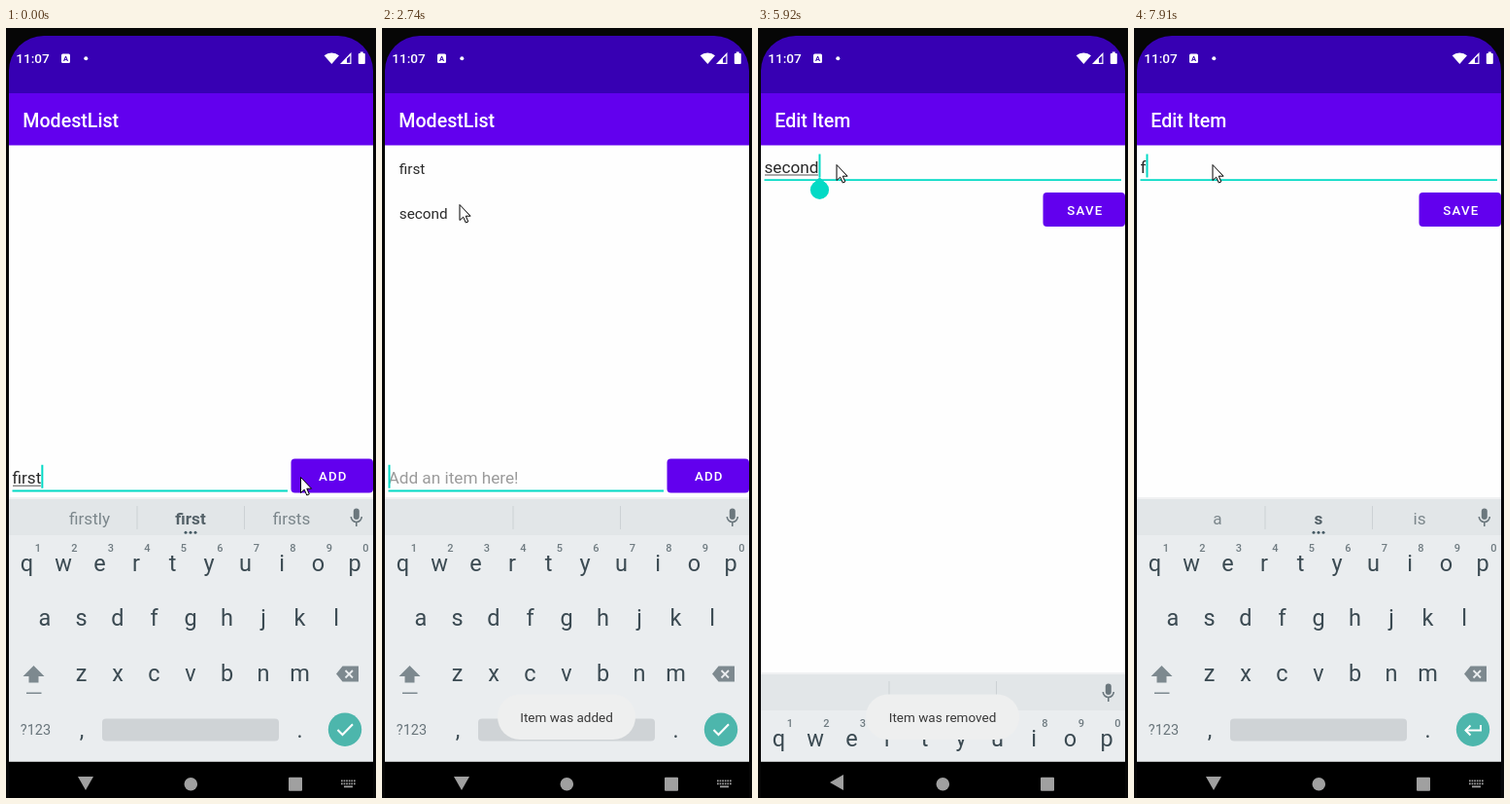
These frames come from a looping animation (381x791 px, 8 s). An HTML page with a canvas:

```html
<!DOCTYPE html>
<html lang="en">
<head>
<meta charset="utf-8">
<style>
  html, body { margin: 0; width: 100%; height: 100%; overflow: hidden; background: #060606; }
  canvas { display: block; }
</style>
</head>
<body>
<canvas id="stage" width="381" height="791"></canvas>
<script>
const LOOP = 8000, STEP = 120, W = 381, H = 791;
const PURPLE = '#6200ee', DARK_PURPLE = '#3700b3', TEAL = '#03dac5', INK = '#2a2a2a';
const KEY_INK = '#3b4a52', ICON_GRAY = '#6b777d', NAV_GRAY = '#a0a0a0', KEY_FILL = '#eaedef';
const APP_NAME = 'ModestList';
const PIVOT = [190.5, 399.5], KEYBOARD_HEIGHT = 270;

// Moments of the story, in ms.
const TAP_ADD = 150, FIRST_SHOWN = 410, TYPE = 650, TYPED = 1490;
const TAP_ADD_AGAIN = 2260, SECOND_SHOWN = 2380, REMOVE = 4040, REMOVED_NOTICE = 4280;
const OPEN_EDITOR = 5300, EDITOR_READY = 5540, FOCUS = 5800, KEYBOARD_RISE = 5920;
const KEYBOARD_UP = 6160, ERASE = 7190, RETYPE = 7910;

const pointerStart = [303, 461];
const pointerMoves = [ // start, steps, x, y
  [TAP_ADD, 2, 309.5, 460], [2500, 3, 79.5, 181], [2890, 3, 53, 131], [3280, 3, 38, 143],
  [4540, 4, 73, 141], [5050, 1, 68, 140], [5680, 2, 80.5, 140]];

const completions = {
  first: 'firstly first firsts',
  s: 'a s is',
  se: 'see se send',
  sec: 'second sec security',
  seco: 'seconds second secondary',
  secon: 'seconds second secondary',
  second: 'secondary second seconds'
};

const stage = document.getElementById('stage').getContext('2d');
const layerCanvas = Object.assign(document.createElement('canvas'), { width: W, height: H });
const layer = layerCanvas.getContext('2d');
let c = stage;

// Rises from 0 to 1 in equal steps; the first step is taken at the start itself.
const ramp = (t, start, steps) =>
  Math.min(1, Math.max(0, (Math.floor((t - start) / STEP) + 1) / steps));
const keysPressed = (t, start, interval) => Math.max(0, Math.floor((t - start) / interval) + 1);
const blink = elapsed => elapsed % 1000 < 500;

function newItemText(t) {
  if (t < 270) return 'first';
  return t < SECOND_SHOWN ? 'second'.slice(0, keysPressed(t, TYPE, (TYPED - TYPE) / 5)) : '';
}

function editText(t) {
  return t >= RETYPE ? 'f' : 'second'.slice(0, Math.max(0, 6 - keysPressed(t, ERASE, STEP)));
}

// Suggestions lag one step behind the typing and stay when the field is erased.
function suggestions(t) {
  if (t < OPEN_EDITOR) return newItemText(t) && completions[newItemText(t - STEP)];
  return t >= KEYBOARD_UP + STEP && completions[editText(t - STEP) || 's'];
}

function newItemCaret(t) {
  if (t < TYPED) return true;
  return blink(t - (t < TAP_ADD_AGAIN ? TYPED : TAP_ADD_AGAIN + 10));
}

const editCaret = t => t < KEYBOARD_UP || t >= ERASE || blink(t - KEYBOARD_UP);
const tapGlow = (t, start) => .25 * Math.sin(Math.PI * ramp(t, start, 4));
const keyboardDrop = t =>
  t < OPEN_EDITOR ? 0 : KEYBOARD_HEIGHT * (1 - ramp(t, KEYBOARD_RISE, 3));

function rect(x, y, w, h, color, radius = 0) {
  c.fillStyle = color;
  c.beginPath();
  c.roundRect(x, y, w, h, radius);
  c.fill();
}

function circle(x, y, r, color) {
  c.fillStyle = color;
  c.beginPath();
  c.arc(x, y, r, 0, 7);
  c.fill();
}

function poly(points, color, x = 0, y = 0) {
  c.fillStyle = color;
  c.beginPath();
  for (const [px, py] of points) c.lineTo(x + px, y + py);
  c.closePath();
  c.fill();
}

function stroke(points, color, width) {
  c.strokeStyle = color;
  c.lineWidth = width;
  c.beginPath();
  for (const [x, y] of points) c.lineTo(x, y);
  c.stroke();
}

function text(str, x, y, size, color, { weight = 400, align = 'left', spacing = 0 } = {}) {
  c.font = `${weight} ${size}px Roboto, sans-serif`;
  c.letterSpacing = spacing + 'px';
  c.textAlign = align;
  c.fillStyle = color;
  c.fillText(str, x, y);
  const width = c.measureText(str).width;
  c.letterSpacing = '0px';
  return width;
}

function withAlpha(alpha, draw) {
  if (alpha <= 0) return;
  c.save();
  c.globalAlpha *= alpha;
  draw();
  c.restore();
}

function scaled(factor, draw) {
  c.save();
  c.translate(...PIVOT);
  c.scale(factor, factor);
  c.translate(-PIVOT[0], -PIVOT[1]);
  draw();
  c.restore();
}

function windowFrame(title) {
  rect(3, 8, 375, 783, '#000');
  rect(3, 67, 375, 686.5, '#fefefe');
  rect(3, 8, 375, 59, DARK_PURPLE);
  rect(3, 67, 375, 53.5, PURPLE);
  text(title, 17.3, 101.5, 19.6, '#fff', { weight: 500 });
}

function button(label, y, glow = 0) {
  rect(293.5, y, 84.5, 35, PURPLE, 4);
  withAlpha(glow, () => rect(293.5, y, 84.5, 35, '#fff', 4));
  text(label, 336.8, y + 22.5, 13.3, '#fff', { weight: 500, align: 'center', spacing: 1.2 });
}

function field(str, baseline, right, focused, caret) {
  rect(6.5, baseline + 6.8, right - 6.5, focused ? 1.8 : 1, focused ? TEAL : '#9a9a9a');
  if (!str) text('Add an item here!', 6.5, baseline, 17.2, '#9b9b9b');
  const width = str && text(str, 6.5, baseline, 17.2, INK);
  if (focused && str.length > 1) rect(7, baseline + 2, width - 1, 1, '#555');
  const end = 6.5 + Number(width);
  if (caret) rect(end, baseline - 19, 2, 24, TEAL);
  return end + 1;
}

function listScreen(t, drop) {
  windowFrame(APP_NAME);
  const firstAlpha = ramp(t, FIRST_SHOWN, 2) - ramp(t, REMOVE, 2);
  const secondShift = 46 * (1 - ramp(t, REMOVE + STEP, 3)) ** 2;
  withAlpha(firstAlpha, () => text('first', 17.8, 149.5, 15.3, INK));
  withAlpha(ramp(t, SECOND_SHOWN, 2), () =>
    text('second', 17.8, 149.5 + secondShift, 15.3, INK));
  field(newItemText(t), 467.8 + drop, 290, true, !drop && newItemCaret(t));
  button('ADD', 442.5 + drop, tapGlow(t, TAP_ADD) + tapGlow(t, TAP_ADD_AGAIN));
}

function editScreen(t) {
  windowFrame('Edit Item');
  const focused = t >= FOCUS;
  const word = editText(t);
  if (!word) rect(6.5, 155.3, 367.5, 1.8, TEAL);
  const end = word ? field(word, 148.5, 374, focused, focused && editCaret(t)) : 7.5;
  if (!word) rect(end - 1, 129.5, 2, 24, TEAL);
  button('SAVE', 169);
  if (focused && t < ERASE) {
    circle(end, 166.3, 9.6, TEAL);
    poly([[0, -13], [6.5, -6.5], [-6.5, -6.5]], TEAL, end, 166.3);
  }
}

function mic() {
  rect(357.8, 493.5, 6, 11.5, ICON_GRAY, 3);
  c.strokeStyle = ICON_GRAY;
  c.lineWidth = 1.6;
  c.beginPath();
  c.arc(360.8, 502, 5.5, 0, Math.PI);
  c.stroke();
  rect(360, 507.5, 1.6, 4.5, ICON_GRAY);
}

function keyRow(letters, x, baseline, size, color, weight = 400) {
  [...letters].forEach((key, i) =>
    text(key, x + i * 37.5, baseline, size, color, { weight, align: 'center' }));
}

function suggestionStrip(words) {
  rect(3, 484, 375, 37, '#e2e6e8');
  for (const x of [134.5, 245]) rect(x, 491, 1, 24, '#ccd1d4');
  mic();
  if (!words) return;
  words.split(' ').forEach((word, i) => {
    const middle = i === 1;
    text(word, 86 + i * 104, 510, 17.2, middle ? '#546168' : '#7b868b',
      { weight: middle ? 700 : 400, align: 'center' });
  });
  for (const x of [185, 190, 195]) circle(x, 518.3, 1.5, '#455a64');
}

function enterKey(editing) {
  circle(349, 720.7, 17.2, '#4db6ac');
  if (!editing) {
    stroke([[341.5, 721], [346.5, 726], [357, 715.2]], '#fff', 2.1);
    return;
  }
  stroke([[357, 716], [357, 721.5], [341.5, 721.5]], '#fff', 2);
  stroke([[346.5, 716.5], [341.5, 721.5], [346.5, 726.5]], '#fff', 2);
}

function keyboard(t) {
  const drop = keyboardDrop(t);
  if (drop >= KEYBOARD_HEIGHT) return;
  c.save();
  c.beginPath();
  c.rect(3, 121, 375, 632.5);
  c.clip();
  c.translate(0, drop);
  rect(3, 482, 375, 2, '#f0f1f2');
  rect(3, 484, 375, 270, KEY_FILL);
  suggestionStrip(suggestions(t));

  keyRow('qwertyuiop', 21.5, 557.7, 23.5, KEY_INK);
  keyRow('asdfghjkl', 40, 614.4, 23.5, KEY_INK);
  keyRow('zxcvbnm', 77.5, 671.4, 23.5, KEY_INK);
  keyRow('1234567890', 33, 537.5, 11, '#6f7b81', 500);

  poly([[0, -9.5], [11, 1.5], [5, 1.5], [5, 8], [-5, 8], [-5, 1.5], [-11, 1.5]], '#7d898f', 28.5, 664.5);
  rect(21, 682.5, 15.5, 1.6, '#7d898f');
  poly([[0, 8], [6.5, 0], [23, 0], [23, 16], [6.5, 16]], '#7d898f', 340, 655.5);
  stroke([[349.5, 660], [357, 667.5]], KEY_FILL, 1.8);
  stroke([[357, 660], [349.5, 667.5]], KEY_FILL, 1.8);

  text('?123', 30.5, 726, 14.5, '#68747a', { align: 'center' });
  text(',', 78, 729, 23, KEY_INK, { align: 'center' });
  text('.', 302.5, 729, 23, KEY_INK, { align: 'center' });
  rect(99, 709.5, 182, 23, '#cfd3d6', 4);
  enterKey(t >= OPEN_EDITOR);
  c.restore();
}

function statusIcons() {
  text('11:07', 10.3, 36.3, 13.6, '#fff', { weight: 500 });
  rect(57, 26.5, 9, 9.5, '#fff', 1.5);
  text('A', 61.5, 34.3, 7.5, DARK_PURPLE, { weight: 700, align: 'center' });
  circle(82.3, 31.2, 2, '#fff');
  c.fillStyle = '#fff';
  c.beginPath();
  c.moveTo(335.3, 37);
  c.arc(335.3, 37, 11.6, -Math.PI * .73, -Math.PI * .27);
  c.fill();
  poly([[344, 37], [355.5, 37], [355.5, 25]], '#fff');
  poly([[351, 35.8], [354.3, 35.8], [354.3, 28.5], [351, 31.5]], DARK_PURPLE);
  rect(362.8, 26, 7, 11, '#fff', 1);
  rect(364.8, 24.5, 3, 2, '#fff');
}

function navigationBar(t) {
  const keyboardUp = keyboardDrop(t) === 0;
  rect(3, 765, 375, 26, '#000');
  c.save();
  c.translate(82, 775);
  c.rotate((ramp(t, OPEN_EDITOR + STEP, 2) - ramp(t, KEYBOARD_UP + STEP, 2)) * Math.PI / 2);
  poly([[-8, -6], [8, -6], [0, 8]], NAV_GRAY);
  c.restore();
  circle(190.3, 776.8, 6.8, NAV_GRAY);
  rect(291, 769.8, 14, 14, NAV_GRAY, 1);
  if (!keyboardUp) return;
  for (let i = 0; i < 12; i++)
    rect(345 + i % 6 * 2.6, i < 6 ? 772.5 : 775.5, 1.7, 1.8, NAV_GRAY);
  rect(348, 778.5, 9, 1.8, NAV_GRAY);
}

function toast(message, halfWidth, alpha) {
  withAlpha(alpha, () => {
    rect(190 - halfWidth, 684.5, halfWidth * 2, 46.5, '#eeefef', 23);
    text(message, 190, 712.8, 13.5, '#383838', { align: 'center' });
  });
}

function mousePointer(t) {
  let [x, y] = pointerStart;
  for (const [start, steps, toX, toY] of pointerMoves) {
    const progress = ramp(t, start, steps);
    x += (toX - x) * progress;
    y += (toY - y) * progress;
  }
  poly([[.5, .5], [.5, 16.5], [4.2, 13.2], [6.8, 19], [9.3, 17.9], [6.8, 12.2], [11.6, 12.2]], '#fff', x, y);
  c.strokeStyle = '#000';
  c.lineWidth = 1;
  c.stroke();
}

function transition(t) {
  const progress = ramp(t, OPEN_EDITOR, 3);
  scaled(1 + .1 * progress, () => listScreen(t, KEYBOARD_HEIGHT));
  c = layer;
  c.clearRect(0, 0, W, H);
  scaled(.92 + .08 * progress, () => editScreen(t));
  c = stage;
  withAlpha(1 - (1 - progress) ** 2.5, () => c.drawImage(layerCanvas, 0, 0));
}

function render(t) {
  c.fillStyle = '#060606';
  c.fillRect(0, 0, W, H);
  c.save();
  c.beginPath();
  c.roundRect(3, 8, 375, 783, [36, 36, 0, 0]);
  c.clip();
  if (t < OPEN_EDITOR) listScreen(t, 0);
  else if (t < EDITOR_READY) transition(t);
  else editScreen(t);
  keyboard(t);
  navigationBar(t);
  statusIcons();
  toast('Item was removed', 79, ramp(t, REMOVED_NOTICE, 4) - ramp(t, 6520, 3));
  toast('Item was added', 71, ramp(t, FIRST_SHOWN, 3) - ramp(t, REMOVED_NOTICE + STEP, 2));
  mousePointer(t);
  c.restore();
}

function tick() {
  render(performance.now() % LOOP);
  requestAnimationFrame(tick);
}
tick();
</script>
</body>
</html>
```
